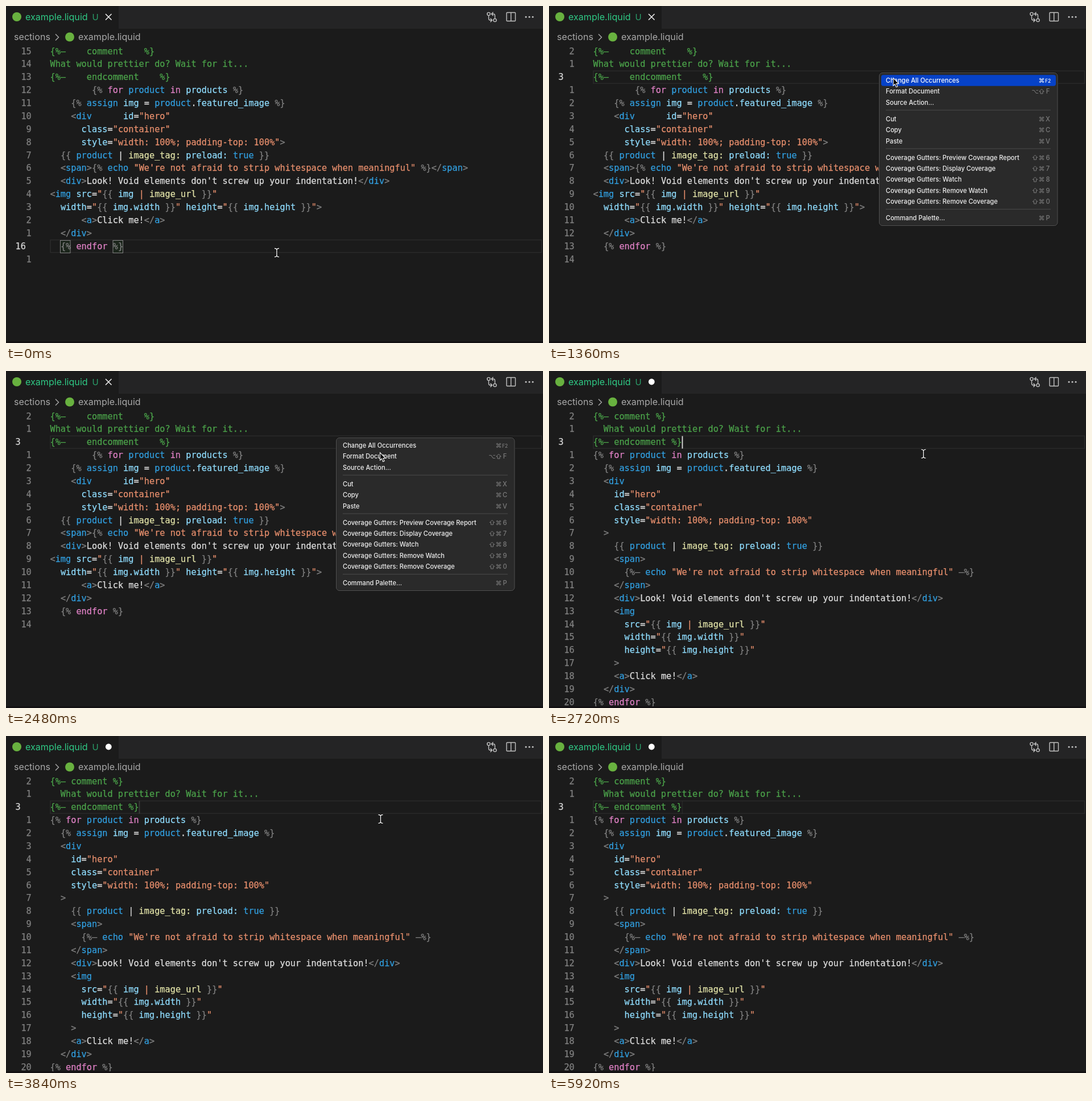
These frames come from a looping animation (944x593 px, 5.96 s). An HTML page:

```html
<!DOCTYPE html>
<html lang="en">
<head>
<meta charset="utf-8">
<title>Formatting a liquid file</title>
<style>
  html, body { margin: 0; width: 100%; height: 100%; overflow: hidden; background: #1b1b1b; }
  svg { display: block; width: 944px; height: 593px; }
  text { white-space: pre; }
  .code text { font: 15.25px "DejaVu Sans Mono", monospace; stroke-width: .25px; }
  .ui { font: 16.1px Inter, sans-serif; }
  .menu text { font: 500 11.12px Inter, sans-serif; fill: #f0f0f0; }
  .menu .key { fill: #7c7c7c; text-anchor: middle; }
  .menu .key.sym { font: 11px "DejaVu Sans", sans-serif; }
  .menu .key.small { font-size: 8.5px; }
  .menu .shift { fill: none; stroke: #7c7c7c; }
  .menu .on text { fill: #fff; }
</style>
</head>
<body>
<svg id="stage" viewBox="0 0 944 593" xmlns="http://www.w3.org/2000/svg"></svg>
<script>
const LOOP = 5960;
const CHAR = 9.181, ROW = 22.875, LEFT = 77.5, TOP = 68;
const CLICK = 800, UNFOCUS = 1240, FORMAT = 2720;

const colors = {
  g: '#7f7f7f', c: '#4ba24a', p: '#de80c4', b: '#319fe0',
  l: '#8fdcfd', s: '#e88f6d', y: '#e2e3a8', w: '#dedede'
};

// "~x" switches to colour x
const before = [
  '~c{%–    comment    %}',
  '~cWhat would prettier do? Wait for it...',
  '~c{%–    endcomment    %}',
  '        ~g{% ~pfor ~bproduct ~pin ~lproducts ~g%}',
  '    ~g{% ~bassign ~limg ~w= ~bproduct~w.~lfeatured_image ~g%}',
  '    ~g<~bdiv      ~lid~w=~s"hero"',
  '      ~lclass~w=~s"container"',
  '      ~lstyle~w=~s"width: 100%; padding-top: 100%"~g>',
  '  ~g{{ ~bproduct ~w| ~yimage_tag: ~lpreload: ~btrue ~g}}',
  '  ~g<~bspan~g>{% ~becho ~s"We\'re not afraid to strip whitespace when meaningful" ~g%}</~bspan~g>',
  '  ~g<~bdiv~g>~wLook! Void elements don\'t screw up your indentation!~g</~bdiv~g>',
  '~g<~bimg ~lsrc~w=~s"~g{{ ~limg ~s| ~yimage_url ~g}}~s"',
  '  ~lwidth~w=~s"~g{{ ~limg.width ~g}}~s" ~lheight~w=~s"~g{{ ~limg.height ~g}}~s"~g>',
  '      ~g<~ba~g>~wClick me!~g</~ba~g>',
  '  ~g</~bdiv~g>',
  '  ~g{% ~pendfor ~g%}',
  ''
];

const after = [
  '~c{%– comment %}',
  '~c  What would prettier do? Wait for it...',
  '~c{%– endcomment %}',
  '~g{% ~pfor ~bproduct ~pin ~lproducts ~g%}',
  '  ~g{% ~bassign ~limg ~w= ~bproduct~w.~lfeatured_image ~g%}',
  '  ~g<~bdiv',
  '    ~lid~w=~s"hero"',
  '    ~lclass~w=~s"container"',
  '    ~lstyle~w=~s"width: 100%; padding-top: 100%"',
  '  ~g>',
  '    ~g{{ ~bproduct ~w| ~yimage_tag: ~lpreload: ~btrue ~g}}',
  '    ~g<~bspan~g>',
  '      ~g{%– ~becho ~s"We\'re not afraid to strip whitespace when meaningful" ~g–%}',
  '    ~g</~bspan~g>',
  '    ~g<~bdiv~g>~wLook! Void elements don\'t screw up your indentation!~g</~bdiv~g>',
  '    ~g<~bimg',
  '      ~lsrc~w=~s"~g{{ ~limg ~s| ~yimage_url ~g}}~s"',
  '      ~lwidth~w=~s"~g{{ ~limg.width ~g}}~s"',
  '      ~lheight~w=~s"~g{{ ~limg.height ~g}}~s"',
  '    ~g>',
  '    ~g<~ba~g>~wClick me!~g</~ba~g>',
  '  ~g</~bdiv~g>',
  '~g{% ~pendfor ~g%}'
];

// label, shortcut symbols; null is a separator
const items = [
  ['Change All Occurrences', '⌘', 'F2'], ['Format Document', '⌥⇧', 'F'], ['Source Action...'], null,
  ['Cut', '⌘', 'X'], ['Copy', '⌘', 'C'], ['Paste', '⌘', 'V'], null,
  ['Coverage Gutters: Preview Coverage Report', '⇧⌘', '6'],
  ['Coverage Gutters: Display Coverage', '⇧⌘', '7'],
  ['Coverage Gutters: Watch', '⇧⌘', '8'],
  ['Coverage Gutters: Remove Watch', '⇧⌘', '9'],
  ['Coverage Gutters: Remove Coverage', '⇧⌘', '0'], null,
  ['Command Palette...', '⌘', 'P']
];

const esc = s => s.replace(/&/g, '&amp;').replace(/</g, '&lt;').replace(/>/g, '&gt;');
const baseline = row => TOP + 16.6 + row * ROW;
const ink = color => `fill="${color}" stroke="${color}"`;

function codeLine(line, row) {
  const spans = line.split('~').map((part, i) =>
    i ? `<tspan ${ink(colors[part[0]])}>${esc(part.slice(1))}</tspan>` : part).join('');
  return `<text x="${LEFT}" y="${baseline(row)}">${spans}</text>`;
}

function lineNumber(row, current) {
  const active = row === current;
  return `<text x="${active ? 16.6 : 44.8}" y="${baseline(row)}" ` +
    `text-anchor="${active ? 'start' : 'end'}" ${ink(active ? '#d8d8d8' : '#808080')}>` +
    `${active ? row + 1 : Math.abs(row - current)}</text>`;
}

function page(id, lines) {
  return `<g id="${id}" class="code">${lines.map(codeLine).join('')}</g>`;
}

function gutter(id, count, current) {
  const rows = Array.from({ length: count }, (_, row) => lineNumber(row, current));
  return `<g id="${id}" class="code">${rows.join('')}</g>`;
}

function symbol(char, x, y) {
  return char === '⇧'
    ? `<path class="shift" d="M${x - 4.2} ${y}l4.2-4.2l4.2 4.2h-2.2v3.8h-4v-3.8z"/>`
    : `<text class="key sym" x="${x}" y="${y + 4}">${char}</text>`;
}

function menu() {
  let y = 131, body = '';
  items.forEach((item, i) => {
    if (!item) {
      body += `<path d="M592 ${y - 6}H882" stroke="#4a4a4a"/>`;
      y += 9.6;
      return;
    }
    const [label, mods = '', key = ''] = item;
    const syms = [...mods].reverse().map((s, n) => symbol(s, 866 - n * 11.5, y)).join('');
    body += `<g id="item${i}"><rect x="584" y="${y - 9.8}" width="307" height="19.6" rx="4" fill="#0642c8" visibility="hidden"/>` +
      `<text x="592" y="${y + 4}">${label}</text>${syms}` +
      `<text class="key${key.length > 1 ? ' small' : ''}" x="877" y="${y + 4}">${key}</text></g>`;
    y += 19.4;
  });
  return `<g id="menu" class="menu">
    <rect x="579.5" y="116.5" width="315.5" height="271" rx="6" fill="#101010"/>
    <rect x="580.5" y="117.5" width="313.5" height="269" rx="5.5" fill="#2a2a2a" stroke="#525252"/>${body}</g>`;
}

const beam = 'M-4-7.5Q0-7.5 0-4.5V4.5Q0 7.5-4 7.5M4-7.5Q0-7.5 0-4.5M0 4.5Q0 7.5 4 7.5';
const bracket = x => `<rect x="${x}" y="412.5" width="17.5" height="22" fill="#1b251b" stroke="#828282"/>`;

document.getElementById('stage').innerHTML = `
  <rect width="944" height="593" fill="#1b1b1b"/>
  <rect x="198" width="746" height="40" fill="#242425"/>
  <rect id="current" x="78" width="863.5" height="22" fill="none" stroke="#2b2b2b" stroke-width="1.4"/>
  <g id="brackets">${bracket(95.5)}${bracket(188)}</g>
  ${page('before', before)}${page('after', after)}
  ${gutter('numsA', 17, 15)}${gutter('numsB', 17, 2)}${gutter('numsC', 23, 2)}
  <rect id="caret" y="114.5" width="1.8" height="22" fill="#dedede"/>
  <rect y="590" width="944" height="3" fill="#131113"/>

  <circle cx="19" cy="19" r="8" fill="#68b13f"/>
  <circle cx="112" cy="54.5" r="8" fill="#68b13f"/>
  <g class="ui">
    <text x="34" y="24.8" fill="#2fc985">example.liquid</text>
    <text x="151.5" y="24.5" fill="#2aa06b" font-size="15">U</text>
    <g fill="#a8a8a8"><text x="14" y="60">sections</text><text x="127" y="60">example.liquid</text></g>
  </g>
  <path d="M87 49.5L92.5 55L87 60.5" fill="none" stroke="#a8a8a8" stroke-width="1.4"/>
  <path id="close" d="M175 14L185.5 24.5M185.5 14L175 24.5" stroke="#ececec" stroke-width="1.6"/>
  <circle id="dirty" cx="180.3" cy="19" r="5.4" fill="#fff"/>
  <g fill="none" stroke="#c3c3c3" stroke-width="1.4">
    <circle cx="848.5" cy="14" r="2.6"/><circle cx="859.5" cy="25" r="2.6"/>
    <path d="M848.5 16.6V22Q848.5 25 851.5 25H854M851.5 21.8L854.6 25L851.5 28.2"/>
    <path d="M859.5 22.4V17Q859.5 14 856.5 14H854M856.5 10.8L853.4 14L856.5 17.2"/>
    <rect x="880" y="11.5" width="15.5" height="15" rx="1"/><path d="M887.7 11.5V26.5"/>
  </g>
  <g fill="#c3c3c3"><circle cx="914" cy="19.3" r="1.5"/><circle cx="920" cy="19.3" r="1.5"/><circle cx="926" cy="19.3" r="1.5"/></g>

  ${menu()}
  <g id="ring" fill="none">
    <circle cx="579.7" cy="123" r="17.3" stroke="#eef8ee" stroke-width="5.6"/>
    <circle cx="579.7" cy="123" r="17.3" stroke="#14c01e" stroke-width="3.4"/>
  </g>
  <g id="beam" fill="none"><path d="${beam}" stroke="#0c0c0c" stroke-width="3.4"/><path d="${beam}" stroke="#f2f2f2" stroke-width="1.4"/></g>
  <path id="arrow" d="M0 0V13.5L3 10.8L5.2 16L7.6 15L5.5 10H9.7Z" fill="#000" stroke="#fff" stroke-width="1.1"/>`;

const el = {};
document.querySelectorAll('[id]').forEach(node => el[node.id] = node);

const show = (node, on) => node.setAttribute('visibility', on ? 'visible' : 'hidden');
const fade = (node, value) => node.setAttribute('opacity', value);
const clamp = u => Math.max(0, Math.min(1, u));
const ramp = (t, from, to) => clamp((t - from) / (to - from));
const ease = u => u * u * (3 - 2 * u);

// pointer stops: time, x, y
const stops = [
  [0, 476, 434], [690, 579, 121], [1160, 579, 121], [1680, 657.5, 138], [1840, 657.5, 138],
  [1960, 657.5, 143.5], [2600, 657.5, 143.5], [2760, 658.5, 146], [4130, 658.5, 146],
  [4670, 438, 565], [4720, 438, 565], [4960, 444, 612], [LOOP, 444, 612]
];

function pointer(t) {
  const i = stops.findIndex(s => s[0] > t);
  const [t0, x0, y0] = stops[i - 1], [t1, x1, y1] = stops[i];
  const u = ease(ramp(t, t0, t1));
  return [x0 + (x1 - x0) * u, y0 + (y1 - y0) * u];
}

function caretAlpha(t) {
  if (t < FORMAT) return t >= CLICK && t < UNFOCUS ? 1 : 0;
  const phase = t - 3300;
  if (phase < 0) return 1;
  const p = phase % 1060;
  return p < 420 ? 1 - ease(ramp(p, 0, 180)) : ramp(p, 420, 640) ** 3;
}

function highlight(item, on) {
  show(item.firstChild, on);
  item.setAttribute('class', on ? 'on' : '');
  item.querySelectorAll('.key').forEach(k => k.style.fill = on ? '#fff' : '');
  item.querySelectorAll('.shift').forEach(k => k.style.stroke = on ? '#fff' : '');
}

function draw(t) {
  const clicked = t >= CLICK, formatted = t >= FORMAT;
  const menuOpen = clicked && !formatted;
  const [x, y] = pointer(t);

  show(el.before, !formatted);
  show(el.after, formatted);
  show(el.numsA, !clicked);
  show(el.numsB, menuOpen);
  show(el.numsC, formatted);
  show(el.brackets, t < UNFOCUS);
  show(el.close, !formatted);
  show(el.dirty, formatted);
  el.current.setAttribute('y', TOP + 0.5 + (clicked ? 2 : 15) * ROW);

  el.caret.setAttribute('x', LEFT + CHAR * (formatted ? 17 : 23));
  fade(el.caret, caretAlpha(t));

  // the menu closes with a short blink, then fades
  const blink = t >= 2440 && t < 2520;
  const row = y < 121.2 ? -1 : y < 140.8 ? 0 : 1;
  fade(el.menu, menuOpen ? 1 - ramp(t, 2560, FORMAT) : 0);
  highlight(el.item0, menuOpen && row === 0);
  highlight(el.item1, menuOpen && row === 1 && !blink);

  fade(el.ring, ramp(t, 720, 800) * (1 - ramp(t, 960, 1120)));
  for (const node of [el.beam, el.arrow]) node.setAttribute('transform', `translate(${x} ${y})`);
  show(el.beam, !menuOpen);
  show(el.arrow, menuOpen);
}

const start = performance.now();
function tick() {
  draw((performance.now() - start) % LOOP);
  requestAnimationFrame(tick);
}
tick();
</script>
</body>
</html>
```
